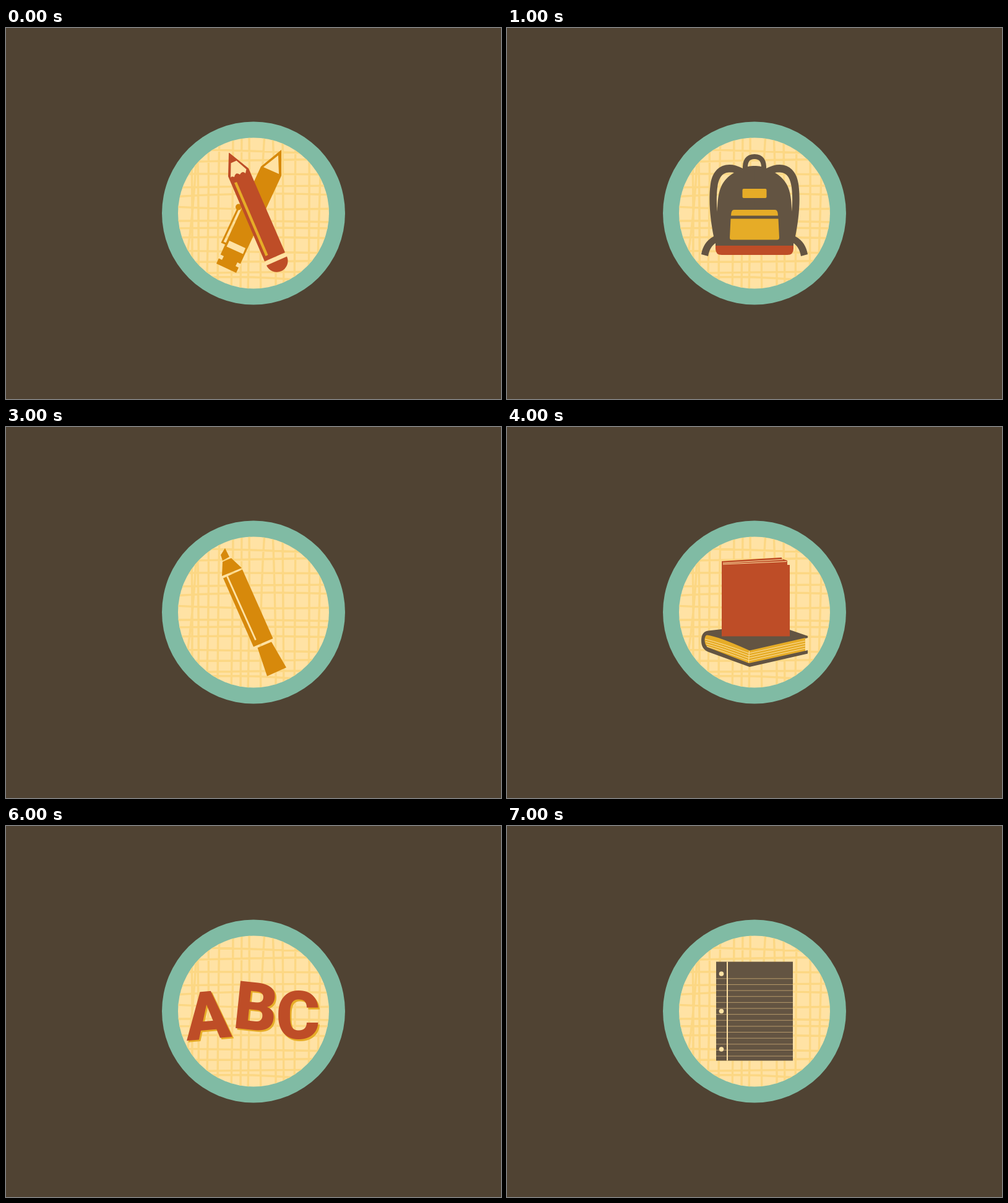
An HTML page for the animation above (8 s loop, 800 px wide and 600 px high).

```html
<!DOCTYPE html>
<html lang="en">
<head>
<meta charset="utf-8">
<title>School badge</title>
<style>
  html, body { margin: 0; width: 100%; height: 100%; overflow: hidden; background: #504333; }
  svg { display: block; width: 800px; height: 600px; }
  .icon { visibility: hidden; }
  .red { fill: #be4d27; }
  .orange { fill: #d7890b; }
  .yellow { fill: #e6ac27; }
  .brown { fill: #635442; }
  .cream { fill: #ffe2a4; }
  .line { fill: none; stroke: #ffe2a4; }
  text { font: 900 118px Roboto, sans-serif; text-anchor: middle; }
</style>
</head>
<body>
<svg viewBox="0 0 800 600">
  <defs>
    <clipPath id="disc"><circle cx="400" cy="299.5" r="122"/></clipPath>
    <path id="packHalf" fill-rule="evenodd" d="M400.5 223C392 223 387 224 381 227C355 213 333 224 329 252C325 280 329 312 334 337C322 343 316 354 314 366L325 369C327 358 331 352 337 348V352H400.5Z
      M367 234C352 232 343 236 340 258C338 275 339 288 340 297C340 262 347 246 367 234Z"/>
    <g id="blade">
      <path d="M-9 -112L9 14L2 24L-7 4Q-13 -50 -9 -112Z"/>
      <path d="M-2 4L10 8L20 44L10 48Z"/>
      <ellipse cx="22" cy="61" rx="12" ry="19" fill="none" stroke="#be4d27" stroke-width="8"/>
    </g>
  </defs>

  <circle cx="400" cy="299.5" r="148" fill="#80bba4"/>
  <circle class="cream" cx="400" cy="299.5" r="122"/>
  <path id="weave" clip-path="url(#disc)" fill="none" stroke="#fcd783" stroke-width="3.4"/>

  <!-- pen and pencil -->
  <g class="icon">
    <g class="orange">
      <path d="M445 197L412 224L340 381L372 396L445 239Z"/>
      <path d="M376 290L349.500 346.500L360 351" fill="none" stroke="#d7890b" stroke-width="3"/>
      <circle cx="376" cy="289.500" r="5"/>
    </g>
    <path class="cream" d="M416 225L440 206L441 236ZM361 344L387 356L383 365.500L356.500 353.500ZM346 366L352 369L349 375L343 372ZM374 379L380 382L377 388L371 385Z"/>
    <path class="red" d="M361 202Q360 201 360 204L359 240L418 377.500L451 363L392 227Z"/>
    <path class="cream" d="M363.500 218.500L372.500 214.500L388.500 228.500L387 235Q382 230 378 237Q371 232 369 241Q364 239 363 242Z"/>
    <path class="yellow" d="M369 250.500L373 249L423.500 367L419.500 369Z"/>
    <path d="M418 378.500L453 363.500L456 370L421 385Z" class="cream"/>
    <path class="red" d="M421 384L454 369.500A18 18 0 0 1 421 384Z"/>
  </g>

  <!-- backpack -->
  <g class="icon">
    <path d="M385 230C384 215 389 208 400 208S416 215 415 230" fill="none" stroke="#635442" stroke-width="8"/>
    <use href="#packHalf" class="brown"/>
    <use href="#packHalf" class="brown" transform="translate(800) scale(-1 1)"/>
    <path class="red" d="M337 352H463V357Q463 367 453 367H347Q337 367 337 357Z"/>
    <rect class="yellow" x="380.500" y="260" width="39" height="15" rx="2"/>
    <path class="yellow" d="M362 303.500Q362 294 367 294H433Q438 294 438 303.500ZM361.500 308.500H438.500L440 339Q440 342.500 436.500 342.500H363.500Q360 342.500 360 339Z"/>
  </g>

  <!-- scissors -->
  <g class="icon red" transform="translate(408 305) rotate(-23)">
    <use href="#blade"/>
    <use href="#blade" transform="scale(-1 1)"/>
    <circle class="cream" cy="8" r="3"/>
  </g>

  <!-- highlighter -->
  <g class="icon">
    <path class="orange" d="M354 196L361 210L350 216L347 207ZM350 218L364 212L381 228L349 241ZM351 244.500L382 230.500L431.500 342L400 355.500ZM406.500 357L429 347.500L453 389L422 403Z"/>
    <path class="line" d="M357.500 241.500L403.500 344.500" stroke-width="2.800"/>
  </g>

  <!-- books -->
  <g class="icon">
    <path class="brown" d="M347 327L325 329.500C316 331 314 338 314 346C314 355 318 361 326 364L392 388L486 366.500V361L482 362V342L486 341V338L457 328Z"/>
    <path class="yellow" d="M323 336.500C318 338 318 352 325 356.500L391 382L482 362V341L392 361.500Q340 338 323 336.500Z"/>
    <path id="pages" class="line"/>
    <path class="red" d="M347 217L444 211V213L453 216V223H457V338.500H347Z"/>
    <path class="line" d="M349 220L446 214.200M349 222L452 217.500"/>
  </g>

  <g class="icon" id="numbers"></g>
  <g class="icon" id="letters"></g>

  <!-- notebook paper -->
  <g class="icon">
    <rect class="brown" x="338" y="219.500" width="124" height="160"/>
    <path id="rules" fill="none" stroke="#b5996a"/>
    <path class="line" d="M356 219.500V379.500" stroke-width="2"/>
    <g class="cream">
      <circle cx="346.500" cy="239" r="3.800"/>
      <circle cx="346.500" cy="299.500" r="3.800"/>
      <circle cx="346.500" cy="361" r="3.800"/>
    </g>
  </g>
</svg>
<script>
  const $ = id => document.getElementById(id);

  // Threads: start, middle and end offset across the disc
  const columns = [
    [299, 301, 300], [309, 311, 311], [327, 327, 324], [345, 343, 342], [367, 366, 364],
    [381, 380, 379], [393, 393, 391], [418, 412, 412], [431, 435, 436], [447, 448, 449],
    [468, 467, 466], [490, 490, 489], [511, 506, 503], [308, 301, 282]
  ];
  const rows = [
    [195, 199, 204], [217, 214, 212], [236, 236, 237], [258, 256, 255], [273, 268, 270],
    [289, 293, 292], [312, 312, 314], [324, 323, 324], [339, 338, 340], [360, 362, 364],
    [378, 378, 376], [397, 395, 394], [406, 403, 414]
  ];
  const bend = (a, b, c) => 2 * b - (a + c) / 2;
  $("weave").setAttribute("d",
    columns.map(([a, b, c]) => `M${a} 170Q${bend(a, b, c)} 300 ${c} 430`).join("") +
    rows.map(([a, b, c]) => `M270 ${a}Q${bend(a, b, c)} ${bend(a, b, c)} 530 ${c}`
      .replace(/Q\S+/, "Q400")).join(""));

  const repeat = (count, make) => Array.from({ length: count }, (_, i) => make(i)).join("");
  $("pages").setAttribute("d", repeat(4, i => {
    const y = 4 * (i + 1);
    return `M${320 + i} ${339 + y}Q345 ${345 + y} 391 ${362 + y}L482 ${342 + y}`;
  }) + "M391.500 362L390.500 381");
  $("rules").setAttribute("d", repeat(14, i => `M338 ${246.8 + i * 9.64}H462`));

  // Glyph, centre x, baseline y, tilt, size
  function spell(id, glyphs) {
    const draw = (fill, shift) => glyphs.map(([char, x, y, tilt, size]) =>
      `<text class="${fill}" style="font-size:${size}px" transform="translate(${x + shift} ${y + shift}) rotate(${tilt})">${char}</text>`).join("");
    $(id).innerHTML = draw("yellow", 2.5) + draw("red", 0);
  }
  spell("numbers", [["1", 330, 345, -5, 118], ["2", 389, 328, 8, 118], ["3", 469, 345, 0, 118]]);
  spell("letters", [["A", 329, 344, -5, 108], ["B", 400, 330, 6, 108], ["C", 472, 344, 0, 108]]);

  const icons = document.querySelectorAll(".icon");
  const hold = 1000;
  const start = performance.now();
  function frame() {
    const current = Math.floor((performance.now() - start) / hold) % icons.length;
    icons.forEach((icon, i) => icon.style.visibility = i === current ? "visible" : "hidden");
    requestAnimationFrame(frame);
  }
  frame();
</script>
</body>
</html>
```
